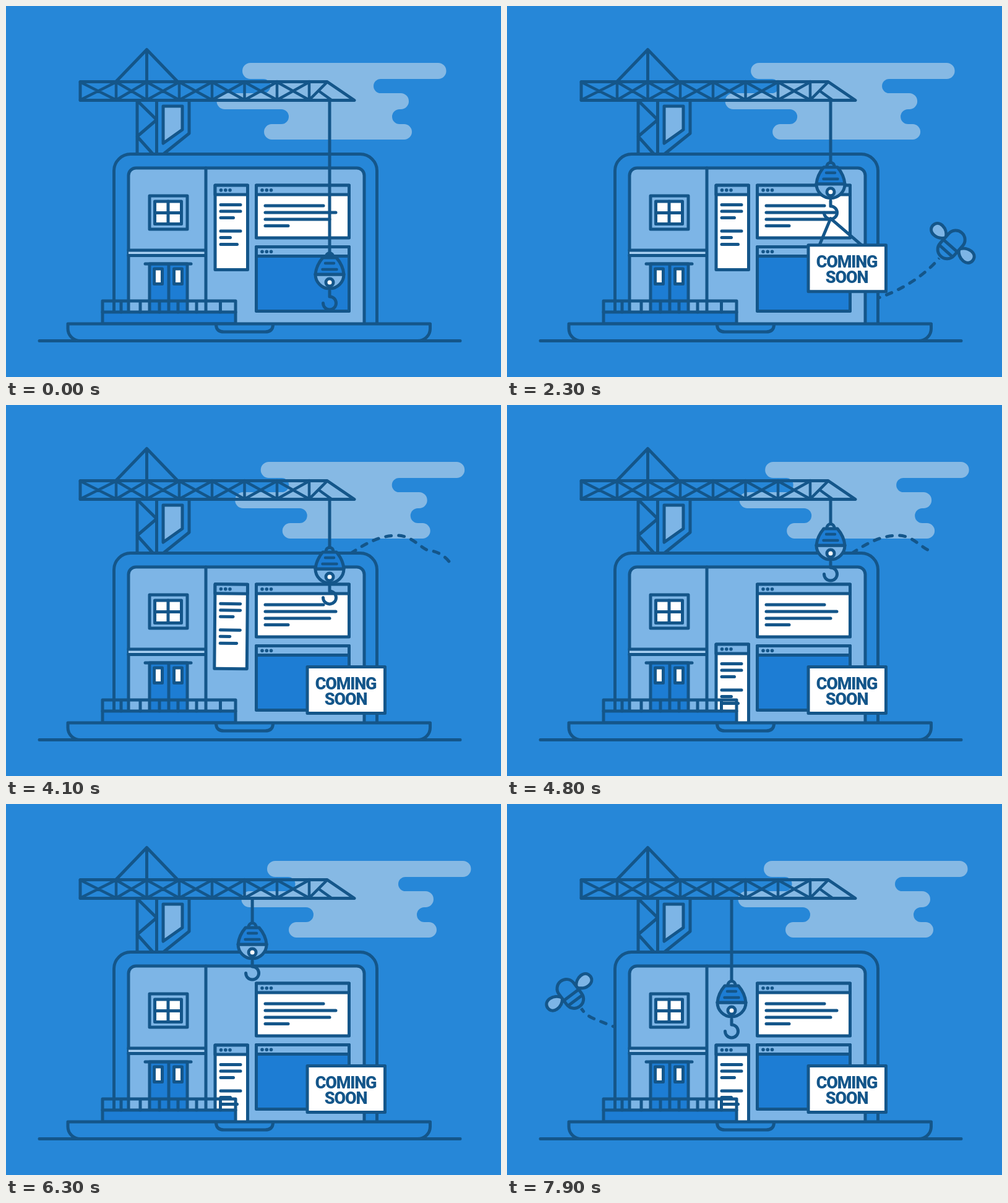
Recreate the animation shown at these times as an HTML page. Size 800 px wide and 600 px high, loop 8 s.

```html
<!DOCTYPE html>
<html lang="en">
<head>
<meta charset="utf-8">
<title>Coming soon</title>
<style>
  html, body { margin: 0; width: 100%; height: 100%; overflow: hidden; background: #2687d8; }
  svg { display: block; width: 100vw; height: 100vh; }
  .ink { fill: none; stroke: #14568a; stroke-width: 5; stroke-linecap: round; stroke-linejoin: round; }
  .bg { fill: #2687d8; }
  .mid { fill: #1d7dd4; }
  .light { fill: #7db5e6; }
  .white { fill: #fff; }
  .pale { fill: #a9d0f2; }
  .dots, text { fill: #14568a; stroke: none; }
  text { font: 900 27px Roboto, sans-serif; letter-spacing: -1.2px; text-anchor: middle; }
  .trail { stroke-dasharray: 9 12; }
  .reveal { stroke: #fff; stroke-width: 12; stroke-linecap: butt; }
</style>
</head>
<body>
<svg viewBox="0 0 800 600">
  <defs>
    <clipPath id="aboveBase"><rect width="800" height="514"/></clipPath>
    <g id="dots" class="dots">
      <circle cx="9.5" cy="7.7" r="2.8"/><circle cx="16.8" cy="7.7" r="2.8"/><circle cx="24" cy="7.7" r="2.8"/>
    </g>
    <path id="wing" class="light" d="M14 -3C22 -17 42 -18 43 -4C43 9 24 11 14 -3Z"/>
    <path id="route0" d="M490 490L560 482C650 468 735 400 735 318C735 270 715 238 682 235C670 231 655 211 633 211C605 211 585 222 560 238L440 340"/>
    <path id="route1" d="M300 400C240 385 180 364 140 347Q128 342 121 332L90 290"/>
    <mask id="mask0" maskUnits="userSpaceOnUse" width="800" height="600"><use href="#route0" id="reveal0" class="ink reveal"/></mask>
    <mask id="mask1" maskUnits="userSpaceOnUse" width="800" height="600"><use href="#route1" id="reveal1" class="ink reveal"/></mask>
  </defs>

  <path id="cloud" fill="#86b9e4" d="M395 92H698.5a13 13 0 0 1 0 26H605.5a11.5 11.5 0 0 0 0 23H638a13 13 0 0 1 0 26H636a12 12 0 0 0 0 24H643.500a12.500 12.500 0 0 1 0 25H429.500a12.500 12.500 0 0 1 0-25H445a12 12 0 0 0 0-24H353.500a13 13 0 0 1 0-26H416a11.500 11.500 0 0 0 0-23H395a13 13 0 0 1 0-26Z"/>

  <g class="ink">
    <!-- crane -->
    <path d="M178 122L227.500 70.500L277 122M227.500 70.500V122"/>
    <path d="M120 122.500H519L563 152.500H120Z"/>
    <path id="truss" stroke-width="4.500"/>
    <path d="M212 153V240M243.500 153V240M212 153L243.500 184L212 211L238 240M296 153V206L255 239"/>
    <path class="light" d="M254 162H285V200L254 222Z"/>

    <!-- bee -->
    <g mask="url(#mask0)"><use href="#route0" class="trail"/></g>
    <g mask="url(#mask1)"><use href="#route1" class="trail"/></g>
    <g id="bee">
      <use href="#wing"/><use href="#wing" transform="scale(-1 1)"/>
      <path class="bg" d="M-15 -11A15 15 0 0 1 15 -11V10C15 19 8 25 0 25S-15 19 -15 10Z"/>
      <path d="M-15 2H15M-14 13H14"/>
    </g>

    <!-- laptop screen -->
    <path class="bg" d="M174.500 514V266.500a27 27 0 0 1 27-27H572.500a27 27 0 0 1 27 27V514"/>
    <path class="light" d="M198 514V274a12 12 0 0 1 12-12H567a12 12 0 0 1 12 12V514"/>

    <!-- house -->
    <rect class="pale" x="198" y="395" width="125" height="8.500" stroke="none"/>
    <path d="M323 262V495M198 395H323M198 403.500H323"/>
    <rect class="light" x="232" y="307" width="61" height="54"/>
    <rect class="white" x="240.500" y="316" width="43" height="36.500"/>
    <path d="M262 316V352M240.500 334.500H283.500"/>
    <path class="mid" d="M232 495V417H293V495M263 417V495"/>
    <path d="M225 417H299"/>
    <path class="white" d="M239.500 425H252.500V449.500H239.500ZM271.500 425H284.500V449.500H271.500Z"/>

    <!-- browser windows -->
    <g clip-path="url(#aboveBase)">
      <g id="sidebar">
        <rect class="white" x="338" y="290" width="52.500" height="136.500"/>
        <rect class="light" x="338" y="290" width="52.500" height="15"/>
        <use href="#dots" x="338" y="290"/>
        <path d="M347 321.500H379M347 332H379M347 342.500H367.500M347 364H379M347 374.500H362.500M347 385.500H373.500"/>
      </g>
    </g>
    <rect class="white" x="404.500" y="290" width="150" height="85"/>
    <rect class="light" x="404.500" y="290" width="150" height="15"/>
    <use href="#dots" x="404.500" y="290"/>
    <path d="M419 323H513M419 334H533M419 345H523M419 355.500H456"/>
    <rect class="mid" x="404.500" y="389.500" width="150" height="104"/>
    <rect class="light" x="404.500" y="389.500" width="150" height="15"/>
    <use href="#dots" x="404.500" y="389.500"/>

    <!-- fence -->
    <rect class="mid" x="156" y="495" width="215" height="19"/>
    <path d="M156 495V477H371V495M186 477V495M217 477V495M248 477V495M278 477V495M308 477V495M346.500 477V495"/>

    <!-- hook and sign -->
    <g clip-path="url(#aboveBase)">
      <path id="cable"/>
      <g id="hook">
        <path d="M-6 -41A6 6.500 0 0 1 6 -41"/>
        <path class="light" d="M-23 -13A23 23 0 1 0 23 -13Z"/>
        <path class="mid" d="M-11 -40H11C17 -33 22 -24 23 -13H-23C-22 -24 -17 -33 -11 -40Z"/>
        <path d="M-7 -31H7M-11.500 -21H11.500" stroke-width="4.500"/>
        <circle class="white" r="6"/>
        <path d="M0 14V23A10.500 10.500 0 1 1 -10.500 33.500"/>
      </g>
      <g id="sign">
        <path id="rope"/>
        <rect class="white" x="487" width="125.500" height="75"/>
        <text x="549" y="36.500">COMING</text>
        <text x="549" y="61">SOON</text>
      </g>
    </g>

    <!-- laptop base -->
    <path class="bg" d="M100 514H685.500V522a20 19.500 0 0 1-20 19.500H120a20 19.500 0 0 1-20-19.500Z"/>
    <path d="M339.500 516C340 524 345 527 352 527H419C426 527 431 524 431.500 516M54 541.500H734"/>
  </g>
</svg>
<script>
const LOOP = 8000, STEP = 100;
const BEE_SPEED = 0.206, TRAIL_LAG = 1511;
const $ = id => document.getElementById(id);
const set = (id, name, value) => $(id).setAttribute(name, value);
const ease = u => (1 - Math.cos(Math.PI * u)) / 2;

// Eased value through [time, value] keys, held outside them.
function track(keys, t) {
  if (t <= keys[0][0]) return keys[0][1];
  for (let i = 1; i < keys.length; i++) {
    const [t0, a] = keys[i - 1], [t1, b] = keys[i];
    if (t < t1) return a + (b - a) * ease((t - t0) / (t1 - t0));
  }
  return keys[keys.length - 1][1];
}

const hookX = [[5100, 523], [6840, 363]];
const hookY = [[0, 447], [600, 475], [1800, 298], [2200, 298], [2800, 337.5],
               [3300, 337.5], [4700, 240], [6656, 240], [8579, 370]];
const drop = [[4100, 0], [4550, 100], [4700, 94], [4900, 100]];
const tilt = [[3800, 0], [4000, 4], [4200, -3], [4450, 0]];
const flights = [1180, 6953];
const routes = flights.map((_, i) => $('route' + i));
const lengths = routes.map(r => r.getTotalLength());

const posts = [120, 178, 227.5, 280, 333, 385.5, 438, 490];
set('truss', 'd', posts.slice(1).map((x, i) =>
  `M${x} 122V152M${posts[i]} 123L${x} 152M${posts[i]} 152L${x} 123`).join('') +
  'M490 152L519 123M505 137L526 152');

function drawBee(t) {
  let pose = null;
  flights.forEach((start, i) => {
    const clamp = d => Math.max(0, Math.min(lengths[i], d));
    const d = BEE_SPEED * (t - start);
    const tip = clamp(d), tail = clamp(d - BEE_SPEED * TRAIL_LAG);
    set('reveal' + i, 'stroke-dasharray', `0 ${tail} ${tip - tail} 9999`);
    if (d <= 0 || d >= lengths[i]) return;
    const a = routes[i].getPointAtLength(clamp(tip - 5));
    const b = routes[i].getPointAtLength(clamp(tip + 1));
    const angle = Math.atan2(b.y - a.y, b.x - a.x);
    pose = `translate(${b.x + 28 * Math.cos(angle)} ${b.y + 28 * Math.sin(angle)})` +
           `rotate(${angle * 180 / Math.PI + 90})`;
  });
  set('bee', 'visibility', pose ? 'visible' : 'hidden');
  if (pose) set('bee', 'transform', pose);
}

function drawSign(t, y) {
  const top = t < 600 ? 561 : t < 2800 ? y + 86 : 423.5;
  const slack = 43 * (1 - Math.min(1, (t - 2850) / 750));
  set('sign', 'transform', `translate(0 ${top})`);
  set('rope', 'd', t < 2900 ? 'M505 0L523 -43L573 0' : `M505 0Q541 ${-2 * slack} 577 0`);
}

function draw(t) {
  const x = track(hookX, t), y = track(hookY, t);
  set('cloud', 'transform', `translate(${40 * ease(t / 6200)} 0)`);
  set('cable', 'd', `M${x} 153V${y - 48}`);
  set('hook', 'transform', `translate(${x} ${y})`);
  set('sidebar', 'transform', `translate(0 ${track(drop, t)}) rotate(${track(tilt, t)} 364 290)`);
  drawSign(t, y);
  drawBee(t);
}

let begin;
function frame(now) {
  begin ??= now;
  const t = Math.floor(((now - begin) % LOOP) / STEP) * STEP;
  draw(t < 200 ? 0 : t);
  requestAnimationFrame(frame);
}
draw(0);
requestAnimationFrame(frame);
</script>
</body>
</html>
```
